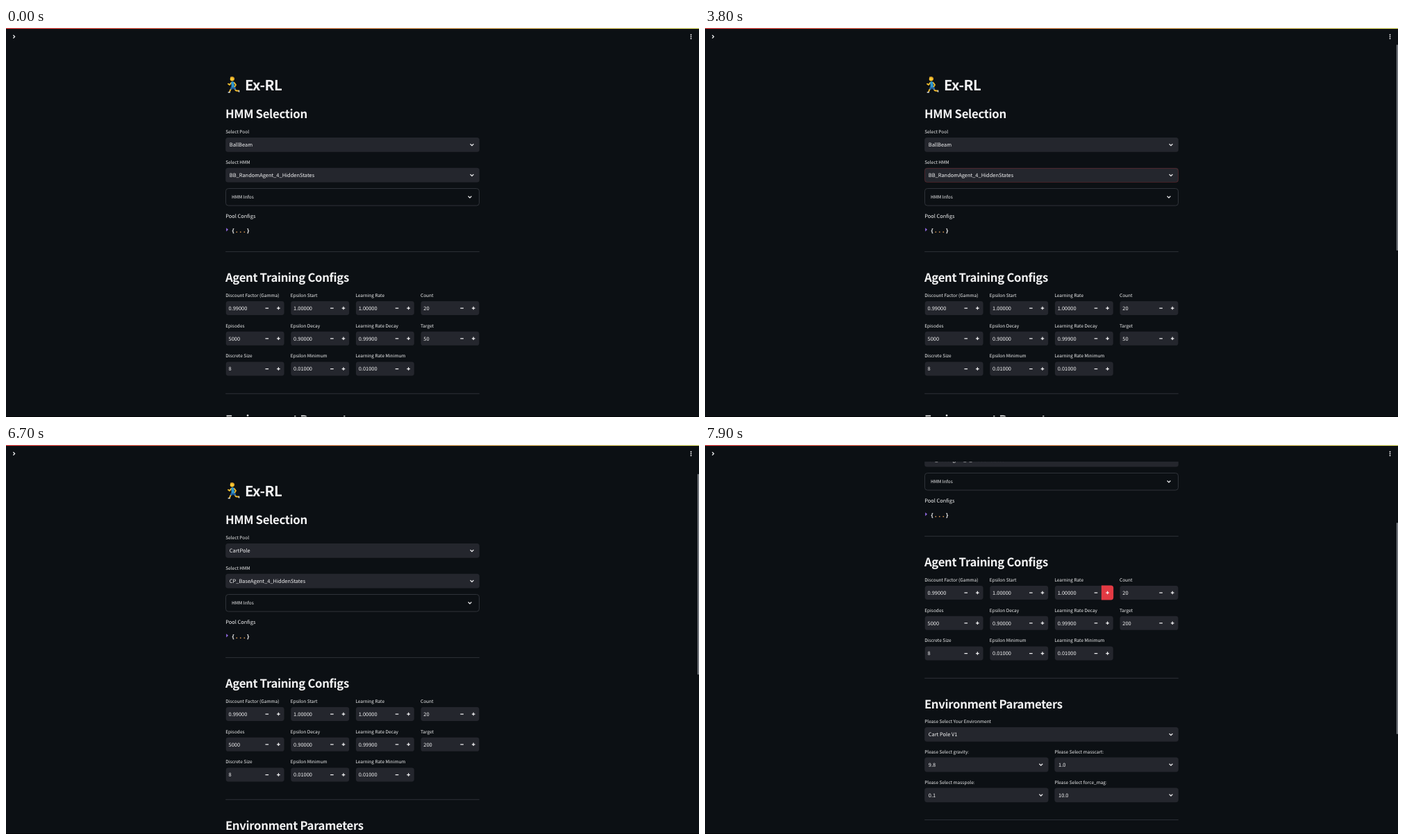
These frames come from a looping animation (998x561 px, 8000 ms). An HTML page:

```html
<!DOCTYPE html>
<html lang="en">
<head>
<meta charset="utf-8">
<title>Ex-RL</title>
<style>
  html, body { margin: 0; width: 100%; height: 100%; overflow: hidden; background: #0c1014; }
  svg { display: block; width: 100vw; height: 100vh; }
  text {
    font-family: "Noto Sans CJK JP", "Noto Sans CJK SC", "Noto Sans CJK", "Open Sans", sans-serif;
    font-size: 7.45px; fill: #f4f4f5; white-space: pre; text-rendering: geometricPrecision;
  }
  .label { font-size: 6.52px; }
  .h1 { font-size: 20.4px; font-weight: 700; letter-spacing: -.027em; }
  .h2 { font-size: 16.75px; font-weight: 600; letter-spacing: -.02em; }
  .mono { font-family: "Noto Sans Mono", "DejaVu Sans Mono", monospace; font-size: 8.32px; font-weight: 700; }
  .dots { font-size: 9.36px; fill: #e9a45c; }
  .box { fill: #24262d; }
  .icon { fill: none; stroke: #f0f0f2; stroke-width: 1.25; }
  .rule { stroke: #2d3037; stroke-width: 1; }
  .focus { fill: none; stroke: #e8323a; stroke-width: 1; }
  .caret { stroke: #f4f4f5; stroke-width: .8; }
</style>
</head>
<body>
<svg id="stage" viewBox="0 0 998 561" preserveAspectRatio="none"></svg>
<script>
const LOOP = 8000, STEP = 100;
const LEFT = 316.2, WIDTH = 365.6, ROW = 20.8, COLUMN = 93.6;
const BG = '#0c1014';

const text = (x, y, value, cls = '', id = '') =>
  `<text x="${x}" y="${y}" class="${cls}" id="${id}">${value}</text>`;
const label = (x, center, value) => text(x, center + 2.5, value, 'label');
const rect = (x, y, w, h, extra) =>
  `<rect x="${x}" y="${y}" width="${w}" height="${h}" ${extra}/>`;
const chevron = (x, y) => `<path class="icon" d="M${x - 2.4} ${y - 1.2}l2.4 2.4l2.4 -2.4"/>`;
const rule = y => `<path class="rule" d="M${LEFT} ${y}h${WIDTH}"/>`;

function select(x, center, width, value, id = '') {
  return rect(x, center - ROW / 2, width, ROW, 'rx="3.6" class="box"') +
    text(x + 5.6, center + 2.9, value, '', id) + chevron(x + width - 10.8, center);
}

function numberInput(column, center, name, value, id = '') {
  const x = LEFT + column * COLUMN;
  return label(x, center - 18.8, name) +
    rect(x + .5, center - 10, 83.9, 20, 'rx="3.4" class="box"') +
    (name === 'Learning Rate'
      ? `<path id="plusHover" fill="#e23a43" d="M${x + 67.5} ${center - 10.4}h13.7a3.6 3.6 0 0 1 3.6 3.6v13.6a3.6 3.6 0 0 1 -3.6 3.6h-13.7z"/>` : '') +
    text(x + 4.3, center + 2.9, value, '', id) +
    `<path class="icon" d="M${x + 57.3} ${center}h4.6M${x + 73.9} ${center}h4.6m-2.3 -2.3v4.6"/>`;
}

function menu(id, top, items) {
  const rows = items.map((item, i) => text(LEFT + 8.1, top + ROW * (i + .5) + 2.9, item)).join('');
  return `<g id="${id}">${rect(LEFT, top, WIDTH, ROW * items.length, `rx="3" fill="${BG}"`)}` +
    rect(LEFT, top, WIDTH, ROW, 'class="hover" rx="2" fill="#202329"') + rows + '</g>';
}

const focusRing = (id, top) => rect(316.5, top, 365, 20, `rx="3.6" class="focus" id="${id}"`);
const caret = (id, x, center) => `<path id="${id}" class="caret" d="M${x} ${center - 5}v10"/>`;

const runner = `<g fill="none" stroke-linecap="round" stroke-linejoin="round">
  <path d="M328.5 87l2.6 3.2l4 .6M324.6 87l-1.6 2.6l-1 2.4" stroke="#f0bc30" stroke-width="1.9"/>
  <path d="M327.6 84.6l1.8 2.8M326 84.6l-1.2 2.6" stroke="#2566a4" stroke-width="3.4"/>
  <path d="M324.6 78.6l-2.6 3.4l-2 -1.4M328.4 78.6l2.6 3.4l-1.6 2.4" stroke="#f5c22e" stroke-width="1.8"/>
  <path d="M326.3 79l.5 4.6" stroke="#2f97cf" stroke-width="4.2"/>
  <path d="M320.2 92.8h2.2M335.6 90.2v1.8" stroke="#cfd6dc" stroke-width="1.4"/>
  <circle cx="325.6" cy="73.6" r="2.9" fill="#fcc832"/>
  <path d="M323.6 71.2q3.2 -1.2 4.8 1.2l-.2 2" stroke="#d39a28" stroke-width="1.5"/></g>`;

const inputs = [
  [0, 404, 'Discount Factor (Gamma)', '0.99000'], [1, 404, 'Epsilon Start', '1.00000'],
  [2, 404, 'Learning Rate', '1.00000'], [3, 404, 'Count', '20'],
  [0, 447.8, 'Episodes', '5000'], [1, 447.8, 'Epsilon Decay', '0.90000'],
  [2, 447.8, 'Learning Rate Decay', '0.99900'], [3, 447.8, 'Target', '50', 'target'],
  [0, 491.5, 'Discrete Size', '8'], [1, 491.5, 'Epsilon Minimum', '0.01000'],
  [2, 491.5, 'Learning Rate Minimum', '0.01000']
];
const params = [
  [0, 652, 'gravity', '9.8'], [1, 652, 'masscart', '1.0'],
  [0, 695.8, 'masspole', '0.1'], [1, 695.8, 'force_mag', '10.0']
];
const agents = (prefix, names) => names.map(name => `${prefix}_${name}_HiddenStates`);

document.getElementById('stage').innerHTML = `
  <defs><linearGradient id="bar"><stop stop-color="#ff4b4b"/><stop offset="1" stop-color="#fffd80"/></linearGradient></defs>
  <rect width="998" height="561" fill="${BG}"/>
  <g id="page">
    ${runner}
    ${text(344, 90.4, 'Ex-RL', 'h1')}
    ${text(LEFT - .3, 130.2, 'HMM Selection', 'h2')}
    ${label(LEFT, 149.7, 'Select Pool')}
    ${select(LEFT, 168.4, WIDTH, 'BallBeam', 'pool')}
    ${label(LEFT, 193.5, 'Select HMM')}
    ${select(LEFT, 212.2, WIDTH, '', 'hmm')}
    ${rect(LEFT + .3, 231.5, WIDTH - .6, 24.6, 'rx="3.8" fill="none" stroke="#34373e" stroke-width=".9"')}
    ${label(325, 243.7, 'HMM Infos')}${chevron(668, 243.7)}
    ${text(LEFT, 274.4, 'Pool Configs')}
    <path d="M317.2 288.2l2.8 2.6l-2.8 2.6z" fill="#9168e0"/>
    ${text(324.4, 295, '{<tspan class="dots">...</tspan>}', 'mono')}
    ${rule(322.6)}
    ${text(LEFT - .3, 366.1, 'Agent Training Configs', 'h2')}
    ${inputs.map(input => numberInput(...input)).join('')}
    ${rule(527.3)}
    ${text(LEFT - .3, 570.6, 'Environment Parameters', 'h2')}
    ${label(LEFT, 589.8, 'Please Select Your Environment')}
    ${select(LEFT, 608.4, WIDTH, 'Cart Pole V1')}
    ${params.map(([side, center, name, value]) => {
      const x = LEFT + side * COLUMN * 2;
      return label(x, center - 18.7, `Please Select ${name}:`) + select(x, center, 178.4, value);
    }).join('')}
    ${rule(731.6)}
    ${menu('poolMenu', 179.3, ['BallBeam', 'MountainCar', 'Pendulum', 'CartPole'])}
    ${menu('ballMenu', 223, agents('BB', ['RandomAgent_4', 'BaseAgent_4', 'BaseAgent_2', 'RandomAgent_2']))}
    ${menu('cartMenu', 223, agents('CP', ['BaseAgent_4', 'BaseAgent_2', 'RandomAgent_4', 'RandomAgent_2']))}
    ${focusRing('poolFocus', 158.5)}${focusRing('hmmFocus', 202.5)}
    ${caret('poolCaret', 356.2, 168.4)}${caret('ballCaret', 445.8, 212.2)}${caret('cartCaret', 432.8, 212.2)}
  </g>
  <rect width="998" height="24" fill="${BG}"/>
  <rect width="998" height="1.1" fill="url(#bar)"/>
  <path class="icon" d="M10.4 10.3l2.2 2.2l-2.2 2.2"/>
  ${[9.7, 12.5, 15.3].map(y => `<circle cx="986.5" cy="${y}" r=".95" fill="#f0f0f2"/>`).join('')}
  <rect id="thumb" x="995.8" width="2" rx="1" fill="#7c8087"/>
  <rect y="560.3" width="998" height=".7" fill="#000"/>`;

const $ = Object.fromEntries([...document.querySelectorAll('[id]')].map(el => [el.id, el]));

// Opacity tables: [time, value], linear between entries.
const fades = {
  poolMenu: [[4000, 0], [4100, .9], [4200, 1], [4900, 1], [5000, 0]],
  ballMenu: [[1800, 0], [1900, .9], [2000, 1], [3400, 1], [3500, 0]],
  cartMenu: [[5700, 0], [5800, .9], [5900, 1], [6300, 1], [6400, 0]],
  poolFocus: [[4000, 0], [4100, 1], [5500, 1], [5700, 0]],
  hmmFocus: [[1800, 0], [1900, 1], [3600, 1], [3800, .2], [3900, 0], [5700, 0], [5800, 1], [6500, 1], [6600, 0]],
  plusHover: [[7700, 0], [7800, .5], [7900, 1]],
  thumb: [[0, 0], [100, .6], [200, 1]]
};
const hovers = {
  poolMenu: [[0, 0], [4400, 1], [4500, 2], [4600, 3]],
  ballMenu: [[0, 0], [2300, 1], [2500, 2], [2700, 3], [3000, 1], [3200, 0]],
  cartMenu: [[0, 1], [6100, 0]]
};
const carets = {
  poolCaret: [[4100, 4600]],
  ballCaret: [[1900, 2400], [2900, 3400]],
  cartCaret: [[5800, 6300]]
};
const scroll = [[6600, 0], [6700, 16], [6800, 78], [6900, 131], [7000, 139], [7100, 141], [7600, 141], [7700, 155], [7800, 178], [7900, 191]];
const thumbTop = [[6600, 24], [6900, 77], [7100, 82], [7600, 82], [7900, 112]];
const thumbHeight = [[5200, 297], [5300, 282], [6600, 282], [6900, 305]];

function tween(table, t) {
  const next = table.findIndex(([time]) => time > t);
  if (next < 0) return table[table.length - 1][1];
  if (next === 0) return table[0][1];
  const [t0, a] = table[next - 1], [t1, b] = table[next];
  return a + (b - a) * (t - t0) / (t1 - t0);
}
const hold = (table, t) => table.filter(([time]) => time <= t).pop()[1];

function draw(now) {
  const t = Math.floor(now % LOOP / STEP) * STEP;
  for (const id in fades) $[id].setAttribute('opacity', tween(fades[id], t));
  for (const id in hovers)
    $[id].querySelector('.hover').setAttribute('transform', `translate(0 ${ROW * hold(hovers[id], t)})`);
  for (const id in carets)
    $[id].setAttribute('opacity', carets[id].some(([from, to]) => t >= from && t < to) ? 1 : 0);
  $.pool.textContent = t < 5000 ? 'BallBeam' : 'CartPole';
  $.hmm.textContent = t < 5300 ? 'BB_RandomAgent_4_HiddenStates' : 'CP_BaseAgent_4_HiddenStates';
  $.target.textContent = t < 5300 ? '50' : '200';
  $.page.setAttribute('transform', `translate(0 ${-tween(scroll, t)})`);
  $.thumb.setAttribute('y', tween(thumbTop, t));
  $.thumb.setAttribute('height', tween(thumbHeight, t));
}

const start = performance.now();
function tick() {
  draw(performance.now() - start);
  requestAnimationFrame(tick);
}
tick();
</script>
</body>
</html>
```
